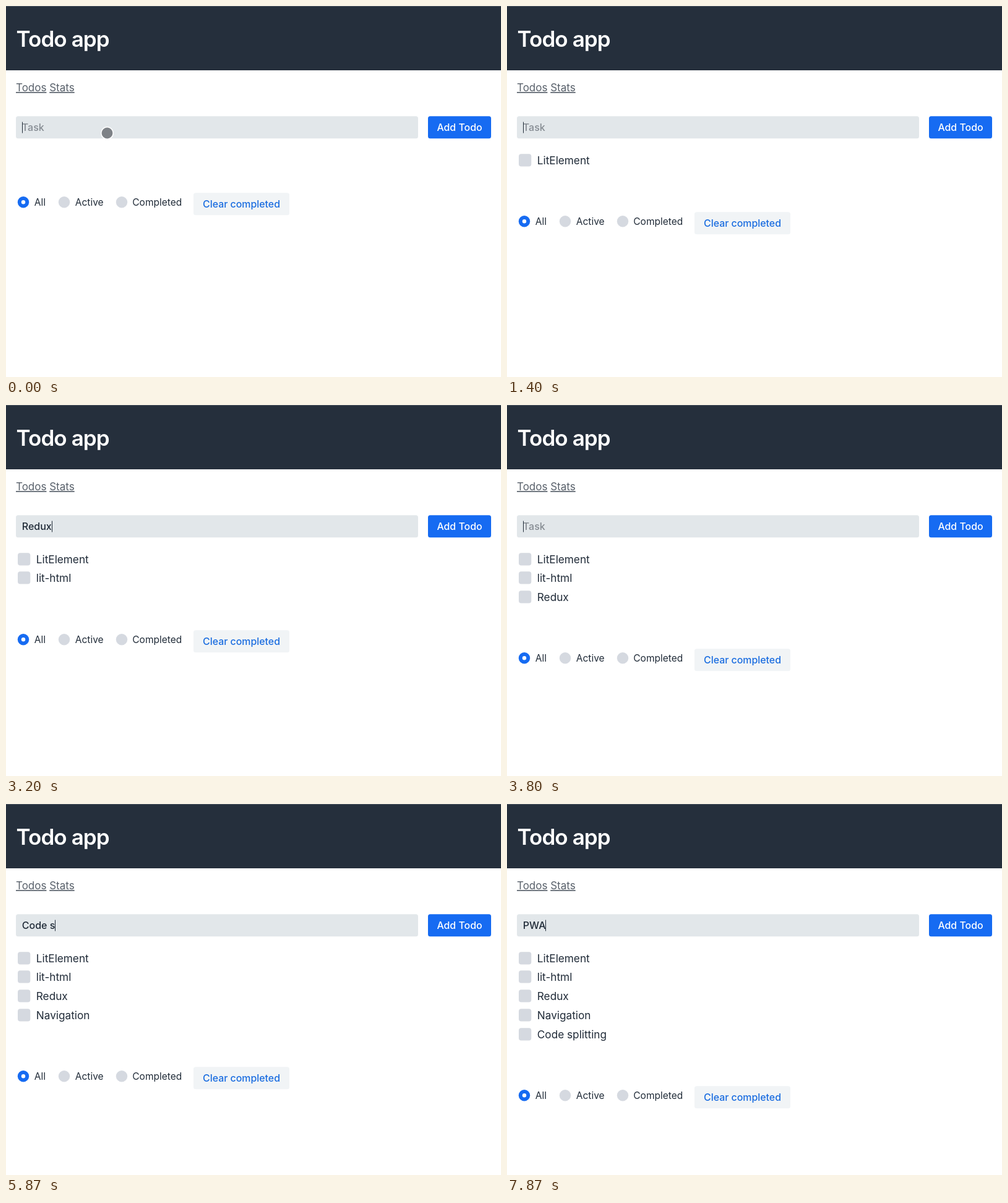
Recreate the animation shown at these times as an HTML page. Size 800x600 px, loop 8000 ms.

```html
<!DOCTYPE html>
<html lang="en">
<head>
<meta charset="utf-8">
<title>Todo app</title>
<style>
  html, body { margin: 0; width: 100%; height: 100%; overflow: hidden; background: #fff; }
  svg { display: block; width: 800px; height: 600px; }
  text { font: 400 17.2px Inter, sans-serif; fill: #202b38; white-space: pre; }
  .title { font-size: 35px; font-weight: 600; letter-spacing: -.9px; fill: #fff; }
  .nav { font-size: 17px; fill: #59616b; }
  .nav tspan { text-decoration: underline; }
  .field { font-size: 16px; font-weight: 500; }
  .hint { fill: #868c93; }
  .button { font-size: 15.9px; font-weight: 500; text-anchor: middle; }
  .filter { font-size: 15.5px; }
  .box { fill: #d5d9e0; }
</style>
</head>
<body>
<svg viewBox="0 0 800 600">
  <rect width="800" height="104" fill="#252f3c"/>
  <rect width="800" height="1" fill="#4b5560"/>
  <text class="title" x="16.5" y="65.5">Todo app</text>
  <text class="nav" x="16" y="138"><tspan>Todos</tspan> <tspan>Stats</tspan></text>

  <rect x="16" y="178.3" width="650" height="36" rx="3.5" fill="#e2e7ea"/>
  <text id="field" class="field" x="25.8" y="202.3"></text>
  <rect id="caret" y="187.5" width="1" height="18" fill="#202b38"/>
  <rect x="682" y="178.3" width="102" height="36" rx="3.5" fill="#166bf2"/>
  <text class="button" x="733" y="202.3" style="fill:#fff">Add Todo</text>

  <g id="list"></g>

  <g id="footer">
    <circle cx="28" cy="317.3" r="9.2" fill="#166bf2"/>
    <circle cx="28" cy="317.3" r="3.2" fill="#fff"/>
    <circle class="box" cx="94" cy="317.3" r="9.2"/>
    <circle class="box" cx="187" cy="317.3" r="9.2"/>
    <text class="filter" x="45.8" y="323.2">All</text>
    <text class="filter" x="111.8" y="323.2">Active</text>
    <text class="filter" x="204.3" y="323.2">Completed</text>
    <rect x="303" y="302.3" width="155" height="36" rx="3.5" fill="#f1f4f6"/>
    <text class="button" x="380.5" y="326.3" style="fill:#196ce0">Clear completed</text>
  </g>

  <circle id="pointer" cx="163.5" cy="205.5" r="9.7" fill="#7e8287" stroke="#fff" stroke-width="1.5"/>
</svg>
<script>
const LOOP = 8000, ROW = 30.8, TEXT_X = 25.8, POINTER_HIDES = 330;

// One key time per character; `end` clears the field, and adds a todo unless it was a typo.
const entries = [
  { word: 'LitElement', keys: [270, 470, 530, 800, 870, 930, 1000, 1100, 1200, 1270], end: 1400 },
  { word: 'lit-html', keys: [1670, 1730, 1870, 2070, 2270, 2330, 2400, 2400], end: 2530 },
  { word: 'Redux', keys: [2800, 2900, 3000, 3100, 3200], end: 3400 },
  { word: 'M', keys: [3670], end: 3800, typo: true },
  { word: 'Navigation', keys: [4070, 4200, 4530, 4600, 4670, 4670, 4730, 4730, 4800, 4800], end: 5000 },
  { word: 'Code splitting',
    keys: [5200, 5330, 5470, 5530, 5670, 5800, 5930, 6000, 6070, 6130, 6200, 6270, 6330, 6330], end: 6530 },
  { word: 'PWA', keys: [7200, 7670, 7870], end: LOOP },
];
const caretOff = [[6800, 7000], [7470, 7670]];

const $ = id => document.getElementById(id);
const field = $('field'), caret = $('caret'), list = $('list');
const todos = entries.filter(e => !e.typo && e.end < LOOP);

list.innerHTML = todos.map((todo, i) => {
  const y = Math.floor(ROW * i);
  return `<g transform="translate(0 ${y})">
    <rect class="box" x="19" y="239.3" width="20.3" height="20.3" rx="4"/>
    <text x="48.8" y="256.2">${todo.word}</text></g>`;
}).join('');

const show = (node, on) => node.setAttribute('visibility', on ? 'visible' : 'hidden');

function draw(t) {
  const { word, keys } = entries.find(e => t < e.end);
  const typed = word.slice(0, keys.filter(k => k <= t).length);
  field.textContent = typed || 'Task';
  field.classList.toggle('hint', !typed);

  const width = typed ? field.getComputedTextLength() : 0;
  caret.setAttribute('x', Math.round(TEXT_X + width));
  show(caret, !caretOff.some(([from, to]) => t >= from && t < to));
  show($('pointer'), t < POINTER_HIDES);

  todos.forEach((todo, i) => show(list.children[i], t >= todo.end));
  const count = todos.filter(todo => t >= todo.end).length;
  $('footer').setAttribute('transform', `translate(0 ${Math.round(ROW * count)})`);
}

const start = performance.now();
function frame() {
  draw((performance.now() - start) % LOOP);
  requestAnimationFrame(frame);
}
frame();
</script>
</body>
</html>
```
